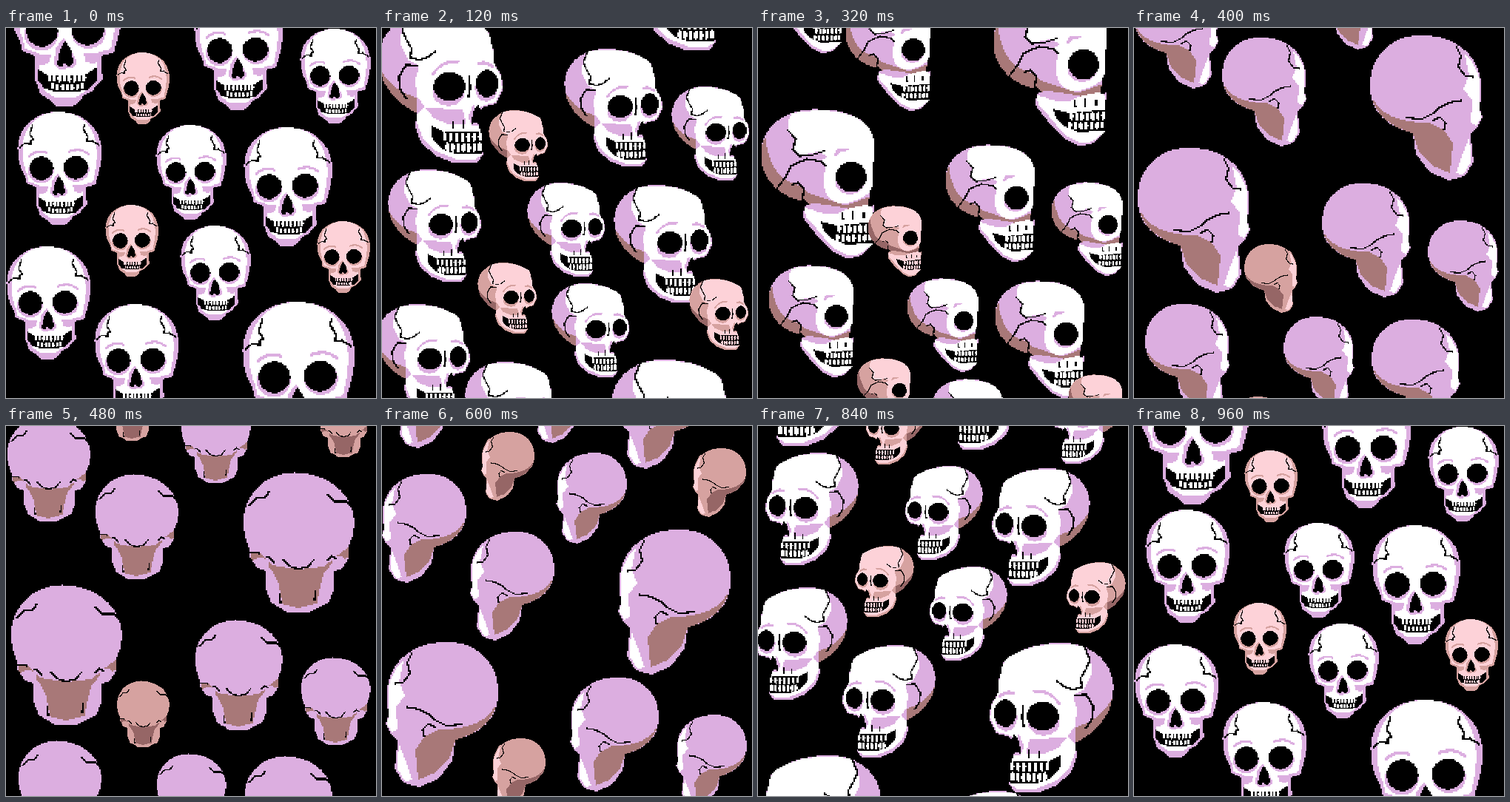
Recreate the animation shown at these times as an HTML page with a canvas. Size 500 by 500 pixels, loop 1000 ms.

```html
<!DOCTYPE html>
<html lang="en">
<head>
<meta charset="utf-8">
<title>Falling skulls</title>
<style>
html, body { margin: 0; width: 100%; height: 100%; overflow: hidden; background: #000; }
canvas { display: block; width: 100vw; height: 100vh; image-rendering: pixelated; }
</style>
</head>
<body>
<canvas id="stage" width="500" height="500"></canvas>
<script>
const STEP = 40, LOOP = 1000, TURN = 24, DROP = 620;
const W = 96, H = 110, CX = 48, TOP = 4;   // sprite size and anchor, in art pixels

const BONE = { w: [255, 255, 255], l: [220, 174, 224], b: [168, 120, 120], k: [0, 0, 0] };
const ROSE = { w: [253, 210, 216], l: [214, 162, 160], b: [150, 102, 102], k: [0, 0, 0] };

const oval = (x, y, rx, ry) =>
  `M${x - rx} ${y}a${rx} ${ry} 0 1 0 ${2 * rx} 0a${rx} ${ry} 0 1 0 ${-2 * rx} 0Z`;

// A row of rounded teeth; bend lowers the middle, tilt lowers the right end.
function teeth(x0, x1, y, h, n, bend = 0, tilt = 0) {
  const step = (x1 - x0) / n;
  let d = '';
  for (let i = 0; i < n; i++) {
    const u = (i + 0.5) / n;
    d += oval(x0 + step * (i + 0.5), y + h / 2 + bend * 4 * u * (1 - u) + tilt * u, step * 0.37, h / 2);
  }
  return d;
}

// Each view: anchor point, scale, then layers of [colour, path, line width].
const front = {
  x: 72, y: 113, k: 1.34,
  layers: [
    ['l', 'M16 163C16 132 42 113 70 113C104 113 128 134 129 166C129 180 126 192 122 204L120 211L107 214L109 238L98 250L90 254L84 262L78 265L62 265L56 259L46 252L41 238L40 214L28 209L26 200C20 190 16 178 16 163Z'],
    ['w', 'M22 163C22 136 42 113 70 113C100 113 121 132 122 164C123 180 120 195 117 207L104 211L103 232L94 248L82 256L60 256L50 249L46 234L45 212L31 207L28 196C24 186 22 176 22 163Z'],
    ['l', 'M31 174Q38 164 56 168M84 167Q100 160 112 171', 3],
    ['l', 'M41 213L58 213L54 222L46 224ZM106 212L90 212L92 221L102 222Z'],
    ['l', oval(47, 193, 17, 16) + oval(95, 191, 17, 16)],
    ['k', oval(48, 189, 16, 16) + oval(94, 188, 16.5, 15.5)],
    ['l', 'M70 196L62 206L60 222L66 228L80 226L83 220Z'],
    ['k', 'M71 199L66 208L63 222L67 226L71 221L75 226L80 221L77 208Z'],
    ['k', 'M43 227L53 234L92 233L104 225L104 238L95 248L84 250L60 250L50 247L44 239Z'],
    ['w', teeth(53, 93, 232, 8, 8, 1) + teeth(56, 91, 241, 7, 7, 1.5)],
    ['k', 'M36 130L32 143L37 150L33 153L34 157L26 155L18 161M106 130L104 136L110 146L109 153L116 152L126 158', 1.8]
  ]
};

const threeQuarter = {
  x: 314, y: 28, k: 1.27,
  layers: [
    ['l', 'M300 28C325 27 350 36 362 46Q369 56 370 82L377 94L379 108L372 124L357 128L354 134L353 150L358 156L358 178L352 187L328 188L308 180L292 166L286 150L287 134C270 126 248 108 247 78C247 46 272 29 300 28Z'],
    ['b', 'M247 84C256 106 272 112 288 119L287 134C270 126 250 112 247 84Z'],
    ['w', 'M277 32C320 25 350 35 362 46Q369 58 370 83L377 95L378 108L371 123L356 127L353 134L353 150L358 156L357 178L350 183L330 184L308 175L294 162L288 146L288 134L296 128L287 116L286 98L290 84L278 78L270 62L271 46Z'],
    ['l', 'M296 129L336 130L340 146L322 147L306 140Z'],
    ['l', 'M304 94Q312 78 332 80M352 82Q361 78 369 86', 3],
    ['l', oval(321, 112, 17, 15) + oval(361, 108, 12, 14)],
    ['k', oval(322, 106, 17, 15.5) + oval(362, 103, 12, 15)],
    ['k', 'M343 94L344 108L342 118', 1.8],
    ['l', 'M348 124L342 138L346 148L354 148Z'],
    ['k', 'M352 125L347 134L345 147L350 144L354 147L355 130Z'],
    ['k', 'M302 147L316 154L358 153L358 177L330 178L314 173L304 162Z'],
    ['w', teeth(314, 358, 154, 10, 7, 1) + teeth(317, 357, 165, 10, 7, 1)],
    ['k', 'M326 143L326 151M337 142L337 150', 1.8],
    ['k', 'M278 31L272 46L276 56L282 66L280 75L290 78L300 74L308 68M360 42L368 52L367 60L372 66M288 84L276 83L268 96L270 110L277 120', 1.8]
  ]
};

const side = {
  x: 81, y: 109, k: 1,
  layers: [
    ['l', 'M72 110C112 108 144 118 154 142C160 156 158 172 155 186L156 210L151 222L154 232L157 242L155 256L156 290L148 300L138 308L122 312L100 302L76 276L62 258L62 246L66 234C34 232 4 206 4 172C4 134 36 111 72 110Z'],
    ['b', 'M10 147C14 186 30 206 52 211L70 224L96 232L118 240L150 228L150 240L112 246L66 238C34 232 4 206 4 172Q4 158 10 147Z'],
    ['w', 'M46 115C100 105 144 116 154 142C160 156 158 172 155 186L156 210L151 222L140 230L116 238Q98 236 91 222Q86 206 92 188L85 180L94 174L82 167L56 172L48 164L51 150L40 138Q40 124 46 115Z'],
    ['w', 'M62 242L80 248L104 250L122 244L150 238L156 244L155 256L156 290L148 298L136 306L120 307L100 296L78 270L65 255Z'],
    ['l', 'M70 236L100 240L122 244L104 252L80 249Z'],
    ['l', 'M102 172Q106 162 114 162L128 165L112 167L106 174Z'],
    ['l', oval(124, 207, 20, 18)],
    ['k', oval(126, 201, 21, 20.5)],
    ['k', 'M159 216L151 227L148 241L153 242L159 236Z'],
    ['k', 'M84 261L107 267L157 262L157 290L120 293L102 286L90 275Z'],
    ['w', teeth(106, 156, 265, 12, 7, 1, -1) + teeth(104, 155, 278, 11, 7, 1, -1)],
    ['k', 'M114 250L115 260M128 248L128 258M143 249L143 258', 2.4],
    ['k', 'M40 138L51 150L47 164L56 173L72 172L90 166M92 186L84 180L66 177L45 186L38 200L22 222M45 212L54 209L62 217L60 232L68 238', 2.2]
  ]
};

const rearQuarter = {
  x: 0, y: 0, k: 1,
  layers: [
    ['l', 'M-10 2C40 0 74 30 75 74L72 100L76 112L68 128L60 134L62 160L64 172L52 192L30 198L4 186L-14 162L-18 134C-50 126 -76 106 -76 72C-76 28 -46 3 -10 2Z'],
    ['b', 'M-74 84C-62 112 -30 120 4 120L24 130L36 148L32 188L8 178L-10 158L-18 134C-50 126 -70 106 -74 84Z'],
    ['w', 'M52 26C70 44 74 62 73 82L71 98L75 112L68 124L60 120L62 90L50 74L58 56Z'],
    ['w', 'M58 140L61 172L50 190L40 188L50 160Z'],
    ['k', 'M40 16L47 30L43 44L52 56L64 58M-28 112L-8 116L8 108L20 98L34 92L48 90M8 118L18 112L26 120L24 130', 2.2]
  ]
};

const back = {
  x: 395, y: 60, k: 1,
  layers: [
    ['l', 'M388 63C436 62 470 92 471 132Q470 148 464 160L463 178L455 192L444 196L443 222L436 238L410 252L380 252L358 238L352 222L352 196L340 192L330 178L328 164Q321 148 321 130C322 92 350 64 388 63Z'],
    ['b', 'M330 170L345 172L360 188L395 194L430 190L446 176L464 163L463 178L442 184L430 198L425 215L420 240L395 246L374 241L368 212L360 196L345 183L331 181Z'],
    ['l', oval(344, 186, 11, 8) + oval(450, 184, 10, 8)],
    ['k', 'M356 88L351 96L338 98L328 108M434 92L444 102L460 102L469 111M374 181L386 191L396 193L408 190L416 181M330 171L344 172M350 176L358 179L362 185M434 181L440 176L446 179M370 226L371 240M418 222L417 236', 2.2]
  ]
};

const views = [front, threeQuarter, side, rearQuarter, back];

// Hard-edged pixel sprite: every layer is cut at half coverage.
function makeSprite(view, pal) {
  const art = document.createElement('canvas');
  art.width = W; art.height = H;
  const g = art.getContext('2d', { willReadFrequently: true });
  const out = g.createImageData(W, H);
  const k = view.k / 2;
  view.layers.forEach(([tone, d, line], n) => {
    g.setTransform(1, 0, 0, 1, 0, 0);
    g.clearRect(0, 0, W, H);
    g.setTransform(k, 0, 0, k, CX - view.x * k, TOP - view.y * k);
    const path = new Path2D(d);
    if (line) {
      g.lineWidth = line;
      g.stroke(path);
    } else {
      g.fill(path);
    }
    const px = g.getImageData(0, 0, W, H).data;
    const cut = line ? 105 : 127;
    for (let i = 0; i < px.length; i += 4) {
      if (px[i + 3] > cut && (n === 0 || out.data[i + 3])) {
        out.data.set(pal[tone], i);
        out.data[i + 3] = 255;
      }
    }
  });
  g.putImageData(out, 0, 0);
  return art;
}

const bone = views.map(v => makeSprite(v, BONE));
const rose = views.map(v => makeSprite(v, ROSE));

// centre x, top y at the start, size
const skulls = [
  [395, 370, 1], [81, -98, 1],
  [314, -50, 0.787], [381, 134, 0.787],
  [72, 113, 0.75], [57, 295, 0.75], [176, 373, 0.75],
  [445, 1, 0.627], [250, 131, 0.627], [283, 267, 0.627],
  [185, 33, 0.475], [170, 239, 0.475], [456, 261, 0.475]
];

const ctx = document.getElementById('stage').getContext('2d');

function stamp(sprite, x, y, size, flip) {
  const s = 2 * size;
  ctx.setTransform(flip ? -1 : 1, 0, 0, 1, x, Math.round(y));
  ctx.drawImage(sprite, -CX * s, -TOP * s, W * s, H * s);
}

function draw(now) {
  const n = Math.floor((now % LOOP) / STEP);
  const pose = Math.floor(n / 3) % 8;
  const flip = pose > 4;
  const view = flip ? 8 - pose : pose;
  ctx.setTransform(1, 0, 0, 1, 0, 0);
  ctx.fillStyle = '#000';
  ctx.fillRect(0, 0, 500, 500);
  ctx.imageSmoothingEnabled = false;
  for (const [x, y0, size] of skulls) {
    const y = (y0 + DROP + DROP * n / TURN) % DROP;
    const sprite = (size < 0.5 ? rose : bone)[view];
    stamp(sprite, x, y, size, flip);
    stamp(sprite, x, y - DROP, size, flip);
  }
}

const start = performance.now();
function tick() {
  draw(performance.now() - start);
  requestAnimationFrame(tick);
}
tick();
</script>
</body>
</html>
```
